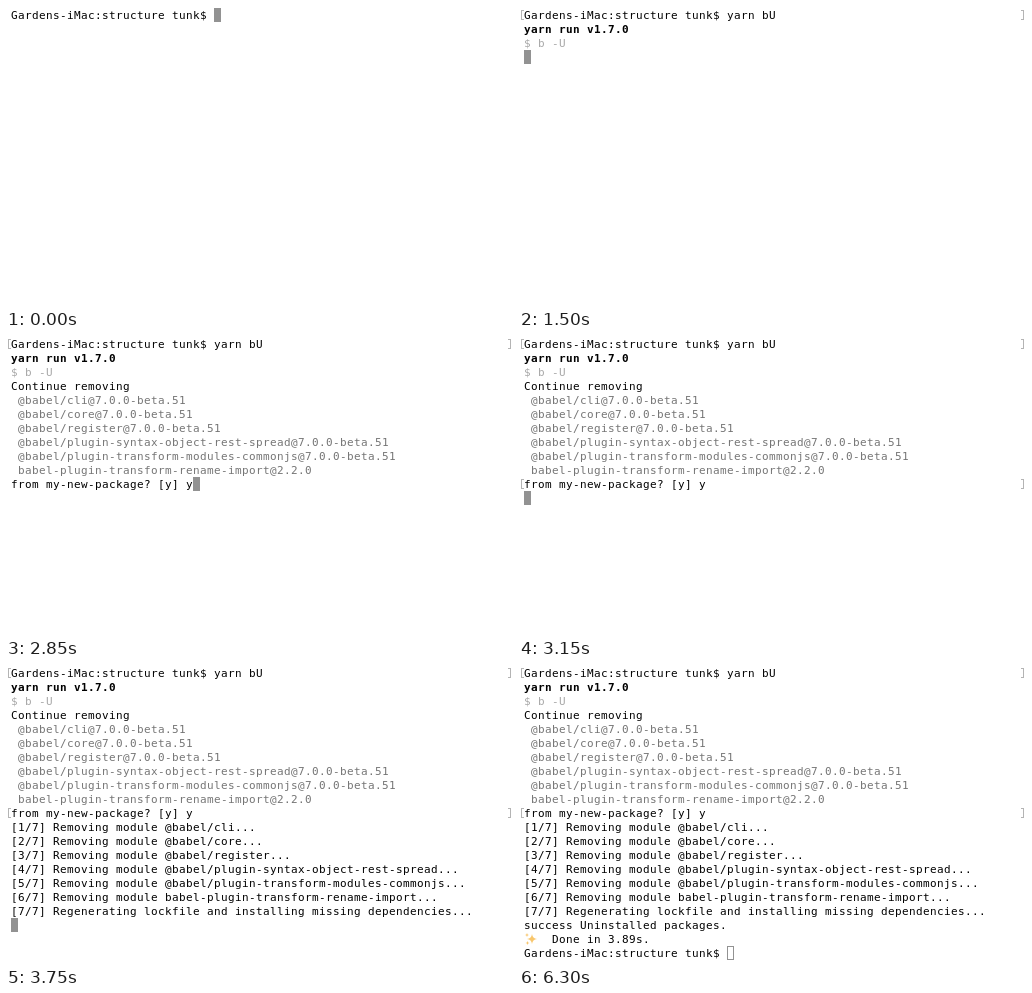
Write an HTML page that moves like this. It is 507 by 301 pixels and loops after 7650 ms.

```html
<!DOCTYPE html>
<html lang="en">
<head>
<meta charset="utf-8">
<title>Removing packages in a terminal</title>
<style>
html, body { margin: 0; width: 100%; height: 100%; overflow: hidden; background: #fff; }
body { position: relative; }

pre {
  position: absolute; left: 5px; top: 3px; margin: 0;
  font: 11px/14px "DejaVu Sans Mono", "Liberation Mono", monospace;
  letter-spacing: calc(7px - 1ch);
  font-variant-ligatures: none;
  color: #000;
}
.dim { color: #a8a8a8; }
.grey { color: #757575; }

/* Terminal marks around an entered line */
.mark {
  position: absolute; left: 2px; top: var(--y);
  box-sizing: border-box; width: 503px; height: 10px;
}
.mark::before, .mark::after {
  content: ""; position: absolute; top: 0;
  box-sizing: border-box; width: 3px; height: 10px;
  border: 1px solid #b4b4b4;
}
.mark::before { left: 0; border-right: 0; }
.mark::after { right: 0; border-left: 0; }

.sparkles { position: absolute; left: 5px; top: 268px; width: 14px; height: 14px; fill: #f8c66c; }

#cursor {
  position: absolute; left: 208px; top: 2px;
  box-sizing: border-box; width: 7px; height: 14px;
  background: #929292; border: 1px solid #929292;
  animation: cursor 7650ms step-end infinite;
}

/* Each part shows from its moment to the end of the loop */
.typed, .enter, .run, .ask, .answer, .accept, .steps, .last, .done {
  animation: 7650ms step-end infinite;
}
.typed  { animation-name: typed; }
.enter  { animation-name: enter; }
.run    { animation-name: run; }
.ask    { animation-name: ask; }
.answer { animation-name: answer; }
.accept { animation-name: accept; }
.steps  { animation-name: steps; }
.last   { animation-name: last; }
.done   { animation-name: done; }

@keyframes typed  { 0% { visibility: hidden } 3.921%, 100% { visibility: visible } }
@keyframes enter  { 0% { visibility: hidden } 13.725%, 100% { visibility: visible } }
@keyframes run    { 0% { visibility: hidden } 19.607%, 100% { visibility: visible } }
@keyframes ask    { 0% { visibility: hidden } 21.568%, 100% { visibility: visible } }
@keyframes answer { 0% { visibility: hidden } 37.254%, 100% { visibility: visible } }
@keyframes accept { 0% { visibility: hidden } 41.176%, 100% { visibility: visible } }
@keyframes steps  { 0% { visibility: hidden } 47.058%, 100% { visibility: visible } }
@keyframes last   { 0% { visibility: hidden } 49.019%, 100% { visibility: visible } }
@keyframes done   { 0% { visibility: hidden } 66.666%, 100% { visibility: visible } }

@keyframes cursor {
  0%      { left: 208px; top: 2px; background: #929292 }
  3.921%  { left: 257px; top: 2px; background: #929292 }
  13.725% { left: 5px; top: 16px; background: #929292 }
  19.607% { left: 5px; top: 44px; background: #929292 }
  21.568% { left: 180px; top: 142px; background: #929292 }
  37.254% { left: 187px; top: 142px; background: #929292 }
  41.176% { left: 5px; top: 156px; background: #929292 }
  47.058% { left: 5px; top: 240px; background: #929292 }
  49.019% { left: 5px; top: 254px; background: #929292 }
  66.666% { left: 208px; top: 282px; background: #929292 }
  82.352%, 100% { left: 208px; top: 282px; background: #fff }
}
</style>
</head>
<body>
<div class="mark enter" style="--y:4px"></div>
<div class="mark accept" style="--y:144px"></div>
<div id="cursor"></div>
<pre>Gardens-iMac:structure tunk$ <span class="typed">yarn bU</span>
<span class="run"><b>yarn run v1.7.0</b>
<span class="dim">$ b -U</span></span>
<span class="ask">Continue removing
<span class="grey"> @babel/cli@7.0.0-beta.51
 @babel/core@7.0.0-beta.51
 @babel/register@7.0.0-beta.51
 @babel/plugin-syntax-object-rest-spread@7.0.0-beta.51
 @babel/plugin-transform-modules-commonjs@7.0.0-beta.51
 babel-plugin-transform-rename-import@2.2.0</span>
from my-new-package? [y] </span><span class="answer">y</span>
<span class="steps">[1/7] Removing module @babel/cli...
[2/7] Removing module @babel/core...
[3/7] Removing module @babel/register...
[4/7] Removing module @babel/plugin-syntax-object-rest-spread...
[5/7] Removing module @babel/plugin-transform-modules-commonjs...
[6/7] Removing module babel-plugin-transform-rename-import...</span>
<span class="last">[7/7] Regenerating lockfile and installing missing dependencies...</span>
<span class="done">success Uninstalled packages.
    Done in 3.89s.
Gardens-iMac:structure tunk$ </span></pre>
<svg class="sparkles done" viewBox="0 0 14 14">
  <path d="M8 2Q8.5 6.3 13 7Q8.5 7.7 8 12Q7.5 7.7 3 7Q7.5 6.3 8 2Z"/>
  <path d="M3 1Q3.2 2.8 5 3Q3.2 3.2 3 5Q2.8 3.2 1 3Q2.8 2.8 3 1Z"/>
  <path d="M3.5 9Q3.7 10.8 5.5 11Q3.7 11.2 3.5 13Q3.3 11.2 1.5 11Q3.3 10.8 3.5 9Z"/>
</svg>
</body>
</html>
```
